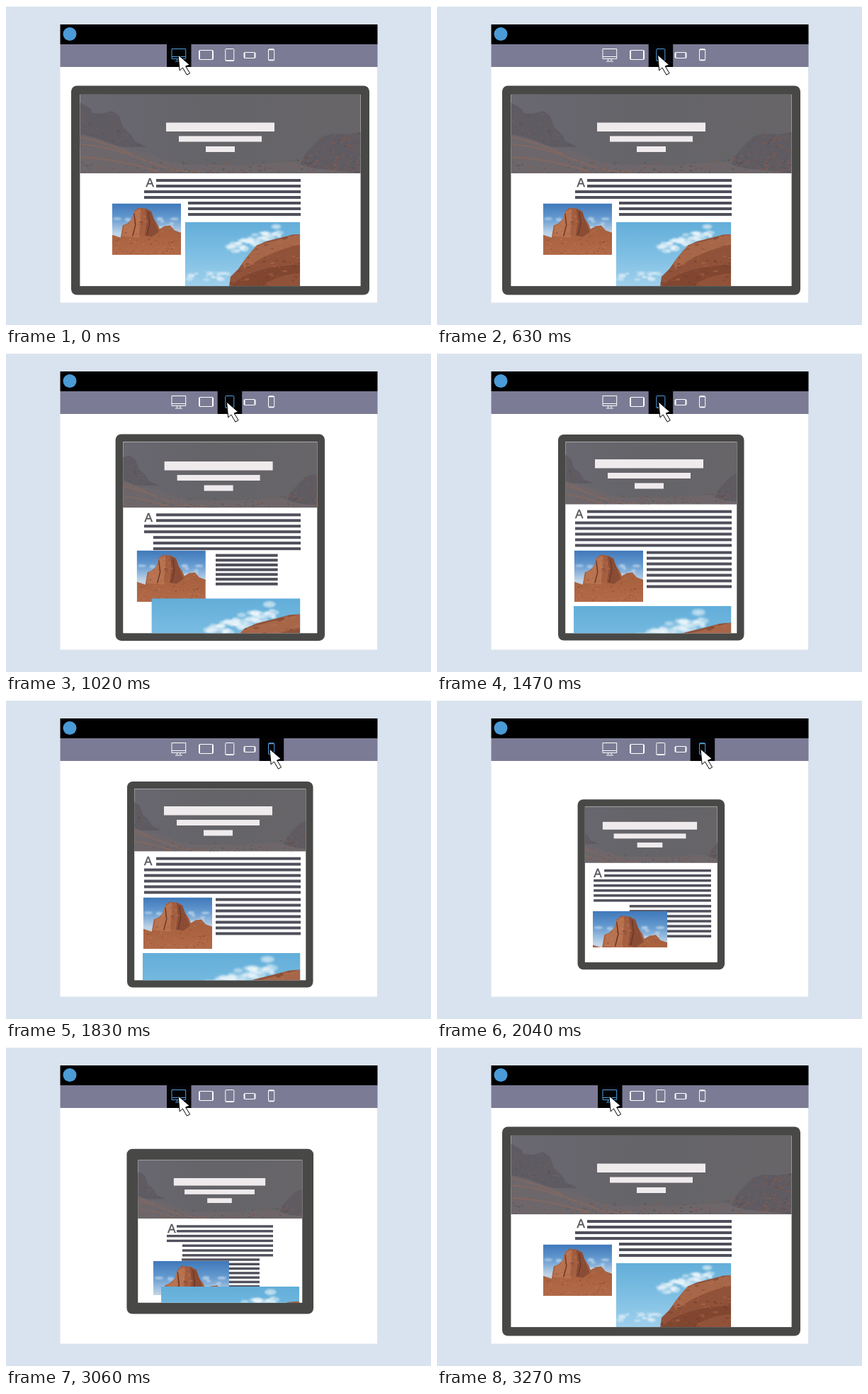
An HTML page that plays this animation: 600x450 px, repeating every 3390 ms.

```html
<!DOCTYPE html>
<html lang="en">
<head>
<meta charset="utf-8">
<title>Responsive preview</title>
<style>
  html, body { margin: 0; width: 100%; height: 100%; overflow: hidden; background: #d9e3ef; }
  #stage { display: block; width: 600px; height: 450px; }
  .icon { fill: none; stroke: #fff; stroke-width: 1; }
  .icon.on { stroke: #4f9fdf; }
  .icon .thick { stroke-width: 1.5; }
  .line { fill: #50505c; }
  .bar { fill: #efebed; }
  #letter { font: 17px "Liberation Sans", Arial, sans-serif; fill: #55555a; stroke: #55555a; stroke-width: .45; }
</style>
</head>
<body>
<svg id="stage" viewBox="0 0 600 450">
  <defs>
    <clipPath id="screenClip"><rect id="clipRect"/></clipPath>
    <clipPath id="cliffClip"><path d="M0 11 L16 20 18 26 31 27 46 23 56 30 61 45 74 58 78 66 96 74 0 74Z
      M397 53 L376 56 356 55 341 60 331 70 316 87 308 111 397 111Z"/></clipPath>
    <clipPath id="butteClip"><path d="M12 48 L15 31 22 28 28 22 31 11 37 6 47 7 55 11 59 22 64 29 67 36 74 32 82 31 88 38 97 41 97 73 0 73 0 44Z"/></clipPath>
    <clipPath id="hillClip"><path d="M62 92 L64 77 75 66 84 53 93 42 101 33 115 27 135 22 150 18 162 17 162 122 62 122Z"/></clipPath>
    <filter id="soft" x="-10%" y="-10%" width="120%" height="120%"><feGaussianBlur stdDeviation="1"/></filter>
    <linearGradient id="dusk">
      <stop offset="0" stop-color="#6a6872"/><stop offset=".45" stop-color="#656468"/><stop offset="1" stop-color="#676568"/>
    </linearGradient>
    <linearGradient id="skyA" x2="0" y2="1">
      <stop offset="0" stop-color="#3f78ba"/><stop offset=".3" stop-color="#689dd1"/><stop offset=".58" stop-color="#c0d4e7"/>
    </linearGradient>
    <linearGradient id="skyB" x2="0" y2="1">
      <stop offset="0" stop-color="#62aed9"/><stop offset=".4" stop-color="#80c0e4"/><stop offset=".8" stop-color="#a4d2ed"/>
    </linearGradient>
    <linearGradient id="ground" x2="0" y2="1">
      <stop offset="0" stop-color="#9a5a40"/><stop offset=".6" stop-color="#a9623f"/><stop offset="1" stop-color="#b26a49"/>
    </linearGradient>
  </defs>

  <rect width="600" height="450" fill="#d9e3ef"/>
  <rect width="600" height="1" fill="#fff"/>
  <rect x="76.5" y="26" width="447.5" height="392.5" fill="#fff"/>
  <rect x="76.5" y="26" width="448" height="28" fill="#000"/>
  <rect x="76.5" y="54" width="448" height="32" fill="#7b7b95"/>
  <circle cx="90" cy="39.5" r="9.5" fill="#4a9bd6"/>
  <rect id="active" y="54" width="34.5" height="32" fill="#030305"/>

  <g class="icon"><path d="M234 60.5h19.7v14h-19.7zM234 71.5h19.7M241.5 74.5v2.5M246 74.5v2.5M239 78h9.8"/></g>
  <g class="icon"><rect x="272.5" y="62.5" width="20" height="13" rx="1.5"/><path class="thick" d="M273.2 63v12M291.8 63v12"/></g>
  <g class="icon"><rect x="309.8" y="60.5" width="12" height="17" rx="1"/><path class="thick" d="M310.3 77h11"/></g>
  <g class="icon"><rect x="336" y="65.5" width="16" height="8" rx="1.2"/><path class="thick" d="M336.8 66v7M351.2 66v7"/></g>
  <g class="icon"><rect x="370.5" y="60.8" width="8.2" height="16" rx="1.2"/><path class="thick" d="M371 61.5h7M371 76.2h7"/></g>

  <rect id="frame" rx="8" fill="#484947"/>
  <rect id="screen" fill="#fff"/>
  <g clip-path="url(#screenClip)">
    <svg id="hero" viewBox="0 0 397 111" preserveAspectRatio="xMidYMid slice">
      <rect width="397" height="111" fill="url(#dusk)"/>
      <g clip-path="url(#cliffClip)"><rect width="397" height="111" fill="#5f5b62"/><g id="cliff"></g></g>
      <path d="M0 56 Q24 60 42 68 T96 82 Q120 94 150 99 L230 99 300 95 330 104 397 111H0Z" fill="#6d676b"/>
      <path d="M0 70 Q40 72 90 92 T170 108 M0 88 Q50 90 110 108 M0 60 Q40 68 74 84" fill="none" stroke="#87685f" stroke-width="1.5"/>
      <g id="scrub"></g>
    </svg>
    <g id="titles">
      <rect class="bar" x="-76.5" width="153" height="12.5"/>
      <rect class="bar" x="-58.5" y="19" width="117" height="8"/>
      <rect class="bar" x="-20.5" y="33.5" width="41" height="8"/>
    </g>
    <text id="letter">A</text>
    <g id="lines"></g>
    <svg id="butte" viewBox="0 0 97 73" preserveAspectRatio="xMidYMin slice">
      <rect width="97" height="73" fill="url(#skyA)"/>
      <g id="haze" filter="url(#soft)"></g>
      <g clip-path="url(#butteClip)">
        <rect width="97" height="73" fill="url(#ground)"/>
        <path d="M14 46 L17 31 24 28 31 12 40 7 42 24 39 48Z" fill="#b8724f"/>
        <path d="M47 7 L56 12 60 25 66 40 56 47 46 45 49 26Z" fill="#8a4c35"/>
        <path d="M41 10 L46 9 47 24 43 44 38 45Z" fill="#a45f42"/>
        <path d="M31 14 L33 30 29 46M51 12 L53 28 49 45" fill="none" stroke="#6d3829" stroke-width="1.5"/>
        <g id="stones"></g>
      </g>
    </svg>
    <svg id="hill" viewBox="0 0 162 122" preserveAspectRatio="xMidYMin slice">
      <rect width="162" height="122" fill="url(#skyB)"/>
      <g id="clouds" filter="url(#soft)"></g>
      <g clip-path="url(#hillClip)">
        <rect width="162" height="122" fill="#91523a"/>
        <path d="M80 58 L101 33 162 17 162 32 Q120 40 84 66Z" fill="#a76648"/>
        <path d="M62 92 Q90 62 162 60 L162 72 Q110 74 80 122H62Z" fill="#814630"/>
        <g id="strata"></g>
      </g>
    </svg>
  </g>

  <path id="cursor" d="M0 0 L2.2 22 6.4 18 12.4 28.2 16.6 25.8 10.6 16 16.2 14Z" fill="#fff" stroke="#000" stroke-width="1" stroke-linejoin="round"/>
</svg>

<script>
const LOOP = 3390, STEP = 30;
const $ = id => document.getElementById(id);
const set = (el, attrs) => { for (const k in attrs) el.setAttribute(k, attrs[k]); return el; };
const add = (parent, tag, attrs) =>
  parent.appendChild(set(document.createElementNS("http://www.w3.org/2000/svg", tag), attrs));

let seed = 7;
const rnd = () => (seed = seed * 16807 % 2147483647) / 2147483647;

// Scatter n small strokes of texture over a box.
function scatter(id, n, [x, y, w, h], size, colors, opacity) {
  for (let i = 0; i < n; i++) {
    const rx = size * (.4 + rnd());
    add($(id), "ellipse", {
      cx: x + w * rnd(), cy: y + h * rnd(), rx, ry: rx * (.3 + .35 * rnd()),
      fill: colors[Math.floor(rnd() * colors.length)], opacity
    });
  }
}
const white = ["#fff", "#e8f3fa"];
scatter("cliff", 220, [0, 10, 96, 64], 1.6, ["#535059", "#7d5c55", "#66636c"], .6);
scatter("cliff", 330, [306, 53, 91, 58], 1.5, ["#535056", "#95583f", "#646168", "#7c5e56"], .7);
for (let i = 0; i < 330; i++) {
  const x = 397 * rnd(), edge = 84 + 12 * Math.sin(x / 397 * Math.PI);
  scatter("scrub", 1, [x, edge, 1, 111 - edge], 1.5, ["#955b48", "#525056", "#7d6159"], .6);
}
scatter("haze", 16, [2, 20, 93, 16], 5, white, .45);
scatter("stones", 220, [0, 8, 97, 65], 1.2, ["#70392a", "#c98562", "#95502f"], .55);
scatter("strata", 200, [60, 14, 102, 106], 2.4, ["#6c3826", "#b37050", "#9a573b"], .45);
for (let i = 0; i < 60; i++) {
  const u = rnd();
  scatter("clouds", 1, [56 + 72 * u, 30 - 24 * u, 14, 15], 5, white, .5);
}
scatter("clouds", 22, [2, 70, 58, 12], 4, white, .5);

// frame: left, top, right, bottom, bezel; title: centre, top, scale
// rows: first y, pitch, left of rows 1-2, 3-4, 5-7, right; more: left, right, first y, pitch
const desktop = {
  frame: [92, 112.5, 513, 407.5, 12.4], head: [236], title: [302.5, 164.5, 1], letter: [197.5, 255],
  rows: [246, 8, 212, 195, 257, 416], more: [296, 260, 301, 1.8], thick: [4],
  butte: [149.7, 278.5, 97.3, 72.5], hill: [252.7, 304.7, 162.6]
};
const tablet = {
  frame: [171, 115, 433.5, 405.5, 10.2], head: [213.5], title: [299.5, 150, 1], letter: [195, 233],
  rows: [223.7, 7.95, 212, 195, 195, 416], more: [296, 416, 281.5, 8], thick: [4],
  butte: [193.7, 278.5, 97.3, 72.5], hill: [193, 357, 222.5]
};
const phone = {
  frame: [226.3, 165.5, 378.5, 355, 10.4], head: [246], title: [301.5, 194, .74], letter: [247.6, 266.5],
  rows: [257.8, 6.1, 260.5, 247.5, 247.5, 357.5], more: [247.5, 358, 300.3, 6.1], thick: [3],
  butte: [246.5, 317, 113.5, 30], hill: [247, 395, 113]
};
const between = {
  frame: [170.5, 143.7, 434, 376.5, 15.8], head: [242], title: [301.5, 185, .845], letter: [228.2, 262],
  rows: [253, 6.8, 241, 227, 249, 377], more: [248, 358, 300, 6.3], thick: [3.4],
  butte: [208, 302, 107, 48], hill: [219, 338, 195]
};

const clamp = u => Math.min(1, Math.max(0, u));
const span = (t, a, b) => clamp((t - a) / (b - a));
const smooth = u => u * u * (3 - 2 * u);
const mix = (a, b, p) => a + (b - a) * p;
const blend = (from, to, p) => Object.fromEntries(
  Object.keys(from).map(k => [k, from[k].map((v, i) => mix(v, to[k][i], p))]));

function layoutAt(t) {
  if (t < 1800) return blend(desktop, tablet, smooth(span(t, 750, 1132)));
  if (t < 2820) return blend(tablet, phone, 1 - (1 - span(t, 1830, 2460)) ** 1.7);
  const p = smooth(span(t, 2880, 3270)), mid = .442;
  return p < mid ? blend(phone, between, p / mid) : blend(between, desktop, (p - mid) / (1 - mid));
}

const rows = Array.from({ length: 14 }, () => add($("lines"), "rect", { class: "line" }));
const icons = document.querySelectorAll(".icon");
const box = (el, x, y, width, height) => set(el, { x, y, width: Math.max(0, width), height: Math.max(0, height) });

function drawPage(s) {
  const [l, top, r, b, bezel] = s.frame;
  const x = l + bezel, y = top + bezel, w = r - l - 2 * bezel, h = b - top - 2 * bezel;
  box($("frame"), l, top, r - l, b - top);
  box($("screen"), x, y, w, h);
  box($("clipRect"), x, y, w, h);
  box($("hero"), x, y, w, s.head[0] - y);
  set($("titles"), { transform: `translate(${s.title[0]} ${s.title[1]}) scale(${s.title[2]})` });
  set($("letter"), { x: s.letter[0], y: s.letter[1] });

  const [y0, pitch, a, m, z, right] = s.rows;
  const [ml, mr, my, mp] = s.more, th = s.thick[0];
  rows.forEach((el, i) => {
    if (i < 7) {
      const left = i < 2 ? a : i < 4 ? m : z;
      box(el, left, y0 + i * pitch - th / 2, right - left, th);
    } else {
      box(el, ml, my + (i - 7) * mp - th / 2, mr - ml, th);
    }
  });
  box($("butte"), ...s.butte);
  const [hx, hy, hw] = s.hill;
  box($("hill"), hx, hy, hw, hw * 122 / 162);
}

// Buttons: icon index, highlight left, cursor x
const buttons = [[0, 227, 243], [2, 298.7, 311.5], [4, 357.7, 372]];
const moves = [[300, 630, 0, 1], [1440, 1800, 1, 2], [2460, 2850, 2, 0]];

function drawPointer(t) {
  let x = buttons[0][2], active = 0;
  for (const [start, end, from, to] of moves) {
    if (t < start) break;
    const p = smooth(span(t, start, end));
    x = mix(buttons[from][2], buttons[to][2], p);
    active = p < .5 ? from : to;
  }
  set($("cursor"), { transform: `translate(${x} 69)` });
  set($("active"), { x: buttons[active][1] });
  icons.forEach((el, i) => el.classList.toggle("on", i === buttons[active][0]));
}

const origin = performance.now();
function tick() {
  const t = Math.floor((performance.now() - origin) % LOOP / STEP) * STEP;
  drawPage(layoutAt(t));
  drawPointer(t);
  requestAnimationFrame(tick);
}
tick();
</script>
</body>
</html>
```
